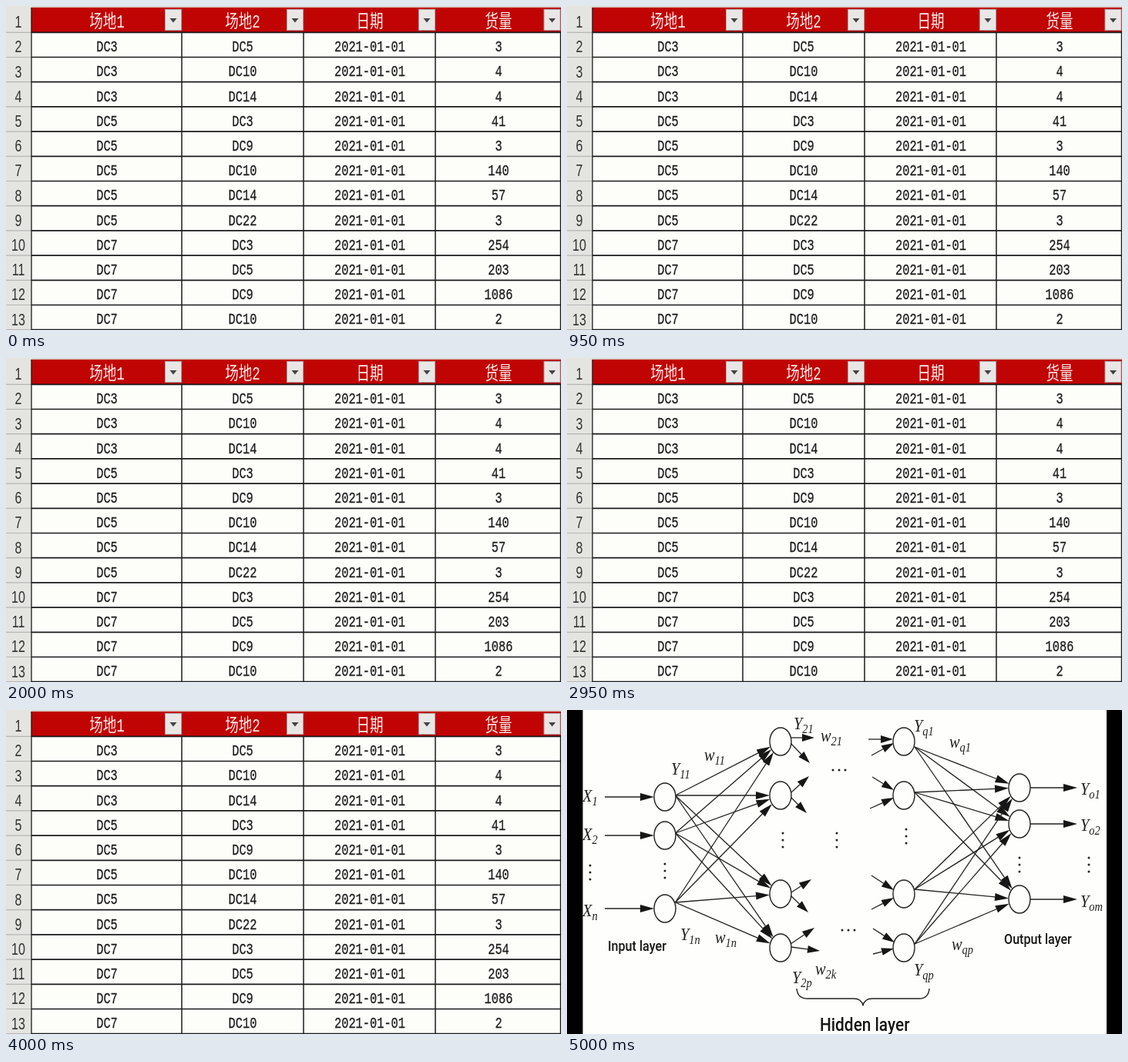
These frames come from a looping animation (720 px wide and 421 px high, 8000 ms). An HTML page:

```html
<!DOCTYPE html>
<html lang="zh">
<head>
<meta charset="utf-8">
<title>Table and network</title>
<style>
  html, body { margin: 0; width: 100%; height: 100%; overflow: hidden; background: #fdfdf9; }
  svg { position: absolute; left: 0; top: 0; display: block; }
  #table { animation: first 8s step-end infinite; }
  #net { animation: second 8s step-end infinite; }
  @keyframes first { 0% { visibility: visible } 62.5%, 100% { visibility: hidden } }
  @keyframes second { 0% { visibility: hidden } 62.5%, 100% { visibility: visible } }
  .cell { font: 21px "Liberation Mono", monospace; fill: #1c1c1c; stroke: #1c1c1c; stroke-width: .3; text-anchor: middle; }
  .head { font: 24px "Liberation Mono", "Noto Sans CJK SC", "Noto Sans CJK", monospace; font-weight: 300; fill: #fbe9e6; text-anchor: middle; }
  .num { font: 22px "Liberation Sans", sans-serif; fill: #333; text-anchor: middle; }
  .sym { font: italic 24px "Liberation Serif", serif; fill: #222; }
  .sub { font-size: 17px; }
  .cap { font: 500 19px Roboto, sans-serif; fill: #161616; }
  .big { font-size: 24.5px; }
</style>
</head>
<body>
<svg width="720" height="421" viewBox="0 0 720 421">
  <g id="table"></g>
  <g id="net"></g>
</svg>
<script>
const rect = (x, y, w, h, fill) =>
  `<rect x="${x}" y="${y}" width="${w}" height="${h}" fill="${fill}"/>`;
const path = (d, color = '#222', width = 1.3) =>
  `<path d="${d}" fill="none" stroke="${color}" stroke-width="${width}"/>`;
// Both pictures are squeezed sideways, k is their aspect.
const text = (x, y, k, cls, s) =>
  `<text class="${cls}" transform="translate(${x} ${y}) scale(${k} 1)">${s}</text>`;

function drawTable() {
  const edges = [33, 228, 386, 557, 719.5];
  const mids = [131, 307, 472, 639];
  const rows = ['DC3 DC5 3', 'DC3 DC10 4', 'DC3 DC14 4', 'DC5 DC3 41', 'DC5 DC9 3',
    'DC5 DC10 140', 'DC5 DC14 57', 'DC5 DC22 3', 'DC7 DC3 254', 'DC7 DC5 203',
    'DC7 DC9 1086', 'DC7 DC10 2'];
  const k = .73, pitch = 32.2, top = 34.3;
  const lineY = i => top + i * pitch;

  let out = rect(0, 0, 720, 421, '#fdfdf9') + rect(0, 0, 33, 421, '#e4e4e1')
    + rect(33, 0, 687, 2, '#d8cfca') + rect(33, 2, 687, 32, '#c00303');

  ['场地1', '场地2', '日期', '货量'].forEach((s, i) => {
    out += text(mids[i], 27.5, k, 'head', s);
    const x = edges[i + 1] - 22;
    out += `<rect x="${x + .5}" y="4.5" width="21" height="27" fill="#e9e7e6" stroke="#aaa3a3"/>`
      + `<path d="M${x + 6.5} 16h9l-4.5 5.5z" fill="#444"/>`;
  });
  out += text(16, 28, k, 'num', 1);

  rows.forEach((row, i) => {
    const [from, to, amount] = row.split(' ');
    const y = 59.2 + i * pitch;
    [from, to, '2021-01-01', amount].forEach((s, c) => out += text(mids[c], y, k, 'cell', s));
    out += text(16, y + 1.2, k, 'num', i + 2);
  });

  for (let i = 0; i <= 12; i++) {
    out += path(`M33 ${lineY(i)}H720`, '#1b1b1b', 1.7) + path(`M0 ${lineY(i)}H33`, '#b5b5b3', 1.2);
  }
  edges.forEach((x, i) => out += path(`M${x} ${i ? top : 2}V421`, '#1b1b1b', i ? 1.5 : 1.3));
  return out;
}

function drawNet() {
  const rx = 14, ry = 18, k = .85;
  const inputs = [113, 163, 258], hidden = [41, 111, 239, 309], outputs = [101, 148, 246];

  function arrow(x1, y1, x2, y2, len = 18) {
    const a = Math.atan2(y2 - y1, x2 - x1), c = Math.cos(a), s = Math.sin(a), w = 5;
    const bx = x2 - len * c, by = y2 - len * s;
    return path(`M${x1} ${y1}L${bx} ${by}`)
      + `<path d="M${x2} ${y2}L${bx - w * s} ${by + w * c}L${bx + w * s} ${by - w * c}z" fill="#161616"/>`;
  }
  // Ends the arrow on the rim of the ellipse at (cx, cy).
  function link(x, y, cx, cy) {
    const dx = x - cx, dy = y - cy, r = Math.hypot(dx / rx, dy / ry);
    return arrow(x, y, cx + dx / r, cy + dy / r);
  }
  const node = (x, y) =>
    `<ellipse cx="${x}" cy="${y}" rx="${rx}" ry="${ry}" fill="#fefefc" stroke="#222" stroke-width="1.4"/>`;
  const dots = (x, y, dx, dy) => [-1, 0, 1].map(i =>
    `<circle cx="${x + i * dx}" cy="${y + i * dy}" r="1.5" fill="#222"/>`).join('');
  const sym = (x, y, s) => text(x, y, k, 'sym',
    `${s[0]}<tspan class="sub" dy="5">${s.slice(1)}</tspan>`);

  let out = rect(0, 0, 720, 421, '#fefefc');

  inputs.forEach((y, i) => {
    out += arrow(49, y, 113, y);
    hidden.forEach(h => out += link(140.5, y - [2, 3, 8][i], 277, h));
  });
  hidden.forEach((y, i) =>
    outputs.forEach(o => out += link(451, y + [7, -4, -6, -5][i], 587, o)));
  outputs.forEach(y => out += arrow(601, y, 662, y));

  [[291, 36, 321, 36], [290, 43, 315, 69], [291, 107, 314, 86], [290, 113, 311, 134],
   [291, 237, 317, 220], [290, 241, 313, 263], [290, 304, 321, 283], [291, 308, 328, 313],
   [391, 38, 423, 38], [395, 59, 424, 43], [396, 87, 424, 104], [393, 128, 424, 114],
   [395, 215, 424, 234], [395, 259, 424, 244], [397, 284, 425, 302], [397, 317, 424, 310]]
    .forEach(a => out += arrow(...a, 16));

  inputs.forEach(y => out += node(127, y));
  hidden.forEach(y => out += node(277, y) + node(437, y));
  outputs.forEach(y => out += node(587, y));

  [[30, 211], [127, 209], [280, 169], [350, 169], [440, 164], [587, 201], [677, 201]]
    .forEach(([x, y]) => out += dots(x, y, 0, 9));
  out += dots(353, 78, 8, 0) + dots(365, 286, 8, 0);

  [[20, 119, 'X1'], [20, 169, 'X2'], [20, 268, 'Xn'], [135, 84, 'Y11'], [178, 66, 'w11'],
   [294, 25, 'Y21'], [329, 41, 'w21'], [450, 28, 'Yq1'], [496, 49, 'wq1'],
   [666, 110, 'Yo1'], [666, 157, 'Yo2'], [666, 256, 'Yom'], [147, 299, 'Y1n'],
   [192, 303, 'w1n'], [292, 355, 'Y2p'], [322, 344, 'w2k'], [450, 345, 'Yqp'], [499, 312, 'wqp']]
    .forEach(a => out += sym(...a));

  out += path('M298 362Q299 375 312 375H372Q382 375 384 384Q386 375 396 375H457Q469 375 470 362', '#222', 1.4)
    + text(53, 313, k, 'cap', 'Input layer')
    + text(567, 304, k, 'cap', 'Output layer')
    + text(328, 417, k, 'cap big', 'Hidden layer');

  return out + rect(0, 0, 20.5, 421, '#000') + rect(700, 0, 20, 421, '#000');
}

document.getElementById('table').innerHTML = drawTable();
document.getElementById('net').innerHTML = drawNet();
</script>
</body>
</html>
```
